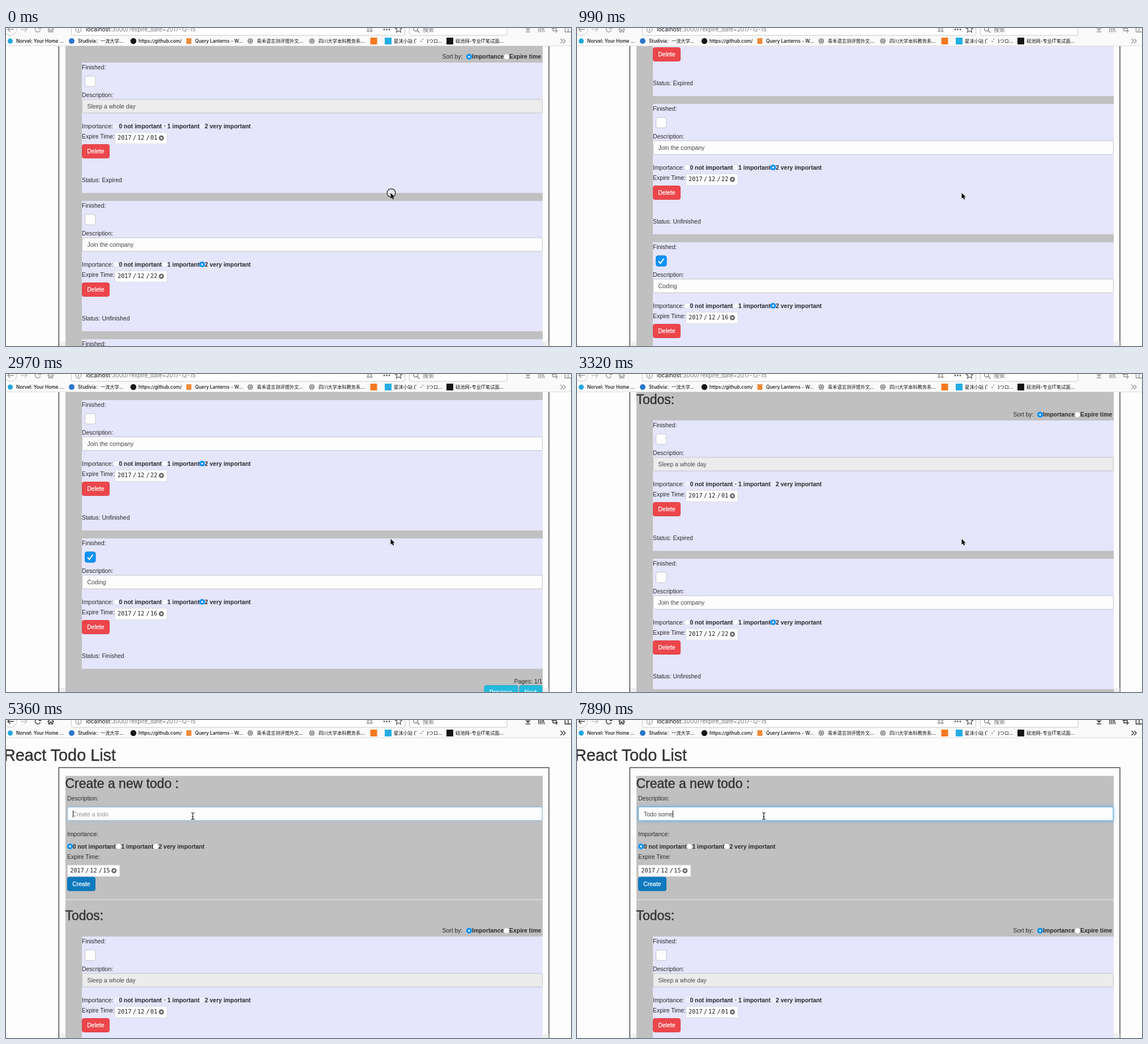
These frames come from a looping animation (998x561 px, 8000 ms). An HTML page:

```html
<!DOCTYPE html>
<html lang="en">
<head>
<meta charset="utf-8">
<title>Todo list</title>
<style>
html, body { margin: 0; width: 100%; height: 100%; overflow: hidden; background: #fdfdfd; }
svg { display: block; width: 100vw; height: 100vh; }
text { font: 10.45px "Liberation Sans", Arial, sans-serif; fill: #2b2b2b; white-space: pre; }
.b { font-weight: 700; }
.h { stroke: #333; stroke-width: .45; fill: #333; }
.h1 { font-size: 28.8px; }
.h2 { font-size: 23px; }
.btn { fill: #fff; stroke: #fff; stroke-width: .25; }
.field { fill: #484848; }
.hint { fill: #929292; }
.date { font: 10.2px "DejaVu Sans Mono", monospace; fill: #222; }
.mark { font: 500 8.25px Inter, "Noto Sans CJK SC", "Noto Sans CJK", sans-serif; fill: #111; }
.url { font: 10.1px Inter, sans-serif; fill: #777; }
.url tspan { fill: #111; }
.menu { font: 500 8.8px Inter, sans-serif; fill: #111; }
#focus { filter: drop-shadow(0 0 3px rgba(80, 170, 240, .75)); }
#menu rect { filter: drop-shadow(0 3px 3px rgba(0, 0, 0, .75)); }
#tools { fill: none; stroke-width: 1.4; stroke: #999; }
#tools.on { stroke: #333; }
</style>
</head>
<body>
<svg viewBox="0 0 998 561" preserveAspectRatio="none">
  <g id="page"></g>
  <g fill="#eeeeee"><path d="M94 553.5h11v8h-11zM948 553.5h10.5v8h-10.5z"/></g>
  <g id="focus"><rect x="108.5" y="153.5" width="838.5" height="24" rx="2.5" fill="#fff" stroke="#5db0ee"/></g>
  <text id="typed" class="field" x="118" y="169.7"></text>
  <path id="caret" d="M.5 159.5v12.5" stroke="#111"/>
  <g id="menu">
    <rect x="108" y="178" width="840" height="14" fill="#fdfdfd"/>
    <text class="menu" x="112" y="188.4">test</text>
  </g>
  <g id="chrome"></g>
  <g id="arrow">
    <circle id="ring" cx="1" cy="0" r="7.4" fill="#fff" fill-opacity=".35" stroke="#222" stroke-width="1.2"/>
    <path d="M0 0V10L2.3 7.9 3.9 11.5 5.6 10.7 4.1 7.3H7.2Z" fill="#000" stroke="#fff" stroke-width=".8" stroke-linejoin="round" paint-order="stroke"/>
  </g>
  <path id="beam" d="M327 163.5q3 0 3 2v8q0 2-3 2M333 163.5q-3 0-3 2v8q0 2 3 2M328.5 170.5h3" fill="none" stroke="#222" stroke-width="1.2"/>
</svg>
<script>
const $ = id => document.getElementById(id);
const text = (x, y, s, cls = '') => `<text x="${x}" y="${y}" class="${cls}">${s}</text>`;
const rect = (x, y, w, h, fill, more = '') =>
  `<rect x="${x}" y="${y}" width="${w}" height="${h}" fill="${fill}" ${more}/>`;
const dot = (x, y, r, fill, more = '') => `<circle cx="${x}" cy="${y}" r="${r}" fill="${fill}" ${more}/>`;

const button = (x, y, w, s, fill, edge) =>
  rect(x + .5, y + .5, w - 1, 24, fill, `rx="3" stroke="${edge}"`) + text(x + 9.3, y + 16.2, s, 'btn');

const input = (x, y, w, s, fill, cls) =>
  rect(x + .5, y + .5, w - 1, 24, fill, 'rx="2.5" stroke="#c2c2c8"') + text(x + 9.5, y + 16.7, s, cls);

function radio(x, y, on, off) {
  if (off) return dot(x, y, 4.6, '#efeffb') + (on ? dot(x, y, 1.3, '#777') : '');
  return on ? dot(x, y, 5.1, '#0d93f8') + dot(x, y, 1.7, '#fff')
            : dot(x, y, 4.7, '#fcfcfc', 'stroke="#ccc" stroke-width=".5"');
}

const levels = (x, y, pick, off) => ['0 not important', '1 important', '2 very important'].map((s, i) => {
  const left = x + [0, 85.7, 151.7][i];
  return radio(left, y, i === pick, off) + text(left + 4.7, y + 3.7, s, 'b');
}).join('');

function dateBox(x, y, day) {
  const parts = [[5, '2017'], [32, '/'], [40, '12'], [55.5, '/'], [63, day]];
  return rect(x + .5, y + .5, 92, 20, '#fdfdfd', 'stroke="#dcdce4"') +
    parts.map(([dx, s]) => text(x + dx, y + 13.6, s, 'date')).join('') +
    dot(x + 82.5, y + 10.2, 4.5, '#666') +
    `<path d="M${x + 80.8} ${y + 8.5}l3.4 3.4m0-3.4l-3.4 3.4" stroke="#fff" stroke-width="1.2"/>`;
}

function card(y, { name, pick, day, status, done, off }) {
  return rect(134, y, 814, 230, '#e5e5fb') +
    text(134, y + 11.8, 'Finished:') +
    rect(139.5, y + 23.8, 18.6, 18.4, done ? '#0d93f8' : '#fdfdfd', `rx="3.5" stroke="${done ? '#0d86e4' : '#c4c4cc'}"`) +
    (done ? `<path d="M144 ${y + 33.5}l3.3 3.7 6-8.4" fill="none" stroke="#fff" stroke-width="2"/>` : '') +
    text(134, y + 60.9, 'Description:') +
    input(134, y + 64.5, 814, name, off ? '#ececec' : '#fdfdfd', 'field') +
    text(134, y + 115.7, 'Importance:') + levels(194.7, y + 112, pick, off) +
    text(134, y + 134, 'Expire Time:') + dateBox(192, y + 122.8, day) +
    button(134, y + 144, 49, 'Delete', '#ec464b', '#dc4147') +
    rect(134, y + 184, 814, 1, '#e9e9f5') +
    text(134, y + 210.6, 'Status: ' + status);
}

const todos = [
  { name: 'Sleep a whole day', pick: 1, day: '01', status: 'Expired', off: true },
  { name: 'Join the company', pick: 2, day: '22', status: 'Unfinished' },
  { name: 'Coding', pick: 2, day: '16', status: 'Finished', done: true }
];

$('page').innerHTML =
  text(-4, 71.5, 'React Todo List', 'h h1') +
  rect(93.3, 84, 865.7, 1200, '#fdfdfd', 'stroke="#333" stroke-width="1.3"') +
  rect(105, 98.5, 843, 1180, '#c0c0c0') +
  text(104.5, 120, 'Create a new todo :', 'h h2') +
  text(108, 142.3, 'Description:') +
  input(108, 153, 840, 'Create a todo', '#fdfdfd', 'hint') +
  text(108, 204.5, 'Importance:') + levels(113, 223, 0) +
  text(108, 245, 'Expire Time:') + dateBox(108.3, 255.5, '15') +
  button(108, 276.7, 50, 'Create', '#0f7abf', '#0d70b0') +
  rect(105, 316.3, 843, 1.2, '#e6e6e6') +
  text(104.5, 353.2, 'Todos:', 'h h2') +
  text(770.5, 375.4, 'Sort by:') +
  radio(818, 371.7, true) + text(823, 375.4, 'Importance', 'b') +
  radio(884, 371.7) + text(889, 375.4, 'Expire time', 'b') +
  todos.map((todo, i) => card(382 + 244 * i, todo)).join('') +
  text(897.5, 1125.7, 'Pages: 1/1') +
  button(844.5, 1129, 60, 'Previous', '#22bbdd', '#1cafd0') +
  button(906.5, 1129, 41, 'Next', '#22bbdd', '#1cafd0');

const globe = x => dot(x, 23, 4.8, '#777') +
  `<path d="M${x - 4} 21.5h8M${x - 4} 24.8h8M${x} 18.5q-4 4.5 0 9q4-4.5 0-9" fill="none" stroke="#eee" stroke-width=".8"/>`;
const square = (x, fill) => rect(x, 17, 12, 12, fill);
const marks = [
  [18, 'Norvel: Your Home ...'], [127, 'Studivia：一流大学...'], [234, 'https://github.com/'],
  [334, 'Query Lanterns - W...'], [443, '青禾语言测评馆外文...'], [552, '四川大学本科教务系...'],
  [685, '星沫小站 (゜-゜)つロ...'], [794, '砚池网-专业IT笔试面...']
];

$('chrome').innerHTML =
  rect(0, 0, 998, 31.5, '#fafafa') + rect(0, 31, 998, 1, '#dedede') +
  rect(115.5, -12, 589, 25, '#fff', 'rx="2.5" stroke="#c8c8c8"') +
  rect(712.5, -12, 172.5, 25, '#fff', 'rx="2.5" stroke="#c8c8c8"') +
  dot(8, 2.5, 10.5, '#fdfdfd', 'stroke="#c4c4c4"') +
  `<g id="tools">
    <path d="M14 2.5H3m4.5-4.5L3 2.5 7.5 7"/>
    <path d="M60 0a4.6 4.6 0 1 0 .5 4M61.5-3v4h-4"/>
    <path d="M73.5 3l5.5-5 5.5 5M75.3 2v5h2.4V3.5h2.6V7h2.4V2"/>
    <path d="M922-4v8m-3.7-3.4L922 4.2l3.7-3.6M918 6.7h8"/>
    <path d="M941-3V7.5M944-3V7.5M947-3V7.5M948.5-2.5l2.3 10"/>
    <path d="M966-3v8h9M963.5.5h8.5v8"/>
    <path d="M987.5-4h12V7h-12zM993-4V7"/>
    <path d="M979.5 19l4 4-4 4m4.5-8l4 4-4 4"/>
  </g>
  <g fill="none" stroke="#777">
    <path d="M26 2.5h11m-4.5-4.5L37 2.5 32.5 7" stroke="#c4c4c4" stroke-width="1.4"/>
    <circle cx="128" cy="2.8" r="4.8"/><path d="M128 2v3.5M128-.2v1.2" stroke-width="1.3"/>
    <path d="M638-2h3v3h-3zM643.5-2h3v3h-3zM638 3.5h3v3h-3zM643.5 3.5h3v3h-3z"/>
    <path d="M693.5-4l1.8 4 4.2.3-3.2 2.9 1 4.2-3.8-2.3-3.8 2.3 1-4.2-3.2-2.9 4.2-.3z" stroke="#555" stroke-width="1.2"/>
    <circle cx="723.5" cy="1.5" r="3.8" stroke-width="1.3"/><path d="M726.3 4.3l4 4" stroke-width="1.5"/>
  </g>` +
  [668, 672.5, 677].map(x => dot(x, 2.7, 1.4, '#555')).join('') +
  text(141, 6.3, '<tspan>localhost</tspan>:3000/?expire_date=2017-12-15', 'url') +
  text(736, 6.8, '搜索', 'url') +
  dot(7.5, 23, 4.5, '#20a8dc') + dot(116, 23, 5, '#2a76cc') + dot(225, 23, 5.2, '#161616') +
  rect(318.5, 18, 9, 10, '#f08b38') + globe(431.5) + globe(540.3) +
  square(643.5, '#f5791f') + square(669, '#23ade5') + square(778, '#151515') +
  marks.map(([x, s]) => text(x, 26.3, s, 'mark')).join('');

// Each track holds [start, value...] and keeps a value until the next start.
const scroll = [[0, 321], [140, 326], [310, 345], [480, 384], [640, 428], [820, 492], [1000, 556], [1170, 586],
  [2970, 580], [3140, 500], [3320, 300], [3500, 90], [3680, 0]];
const pointer = [[0, 679.5, 291], [3500, 650, 295], [3680, 560, 305.5], [3860, 510, 222], [4040, 440, 190],
  [4190, 385, 177], [4340, 350, 170], [4480, 335, 167], [4630, 330, 167]];
const typing = [[0, ''], [6250, 'T'], [6400, 'To'], [6700, 'Tod'], [6850, 'Todo'], [6990, 'Todo '],
  [7290, 'Todo s'], [7590, 'Todo so'], [7740, 'Todo som'], [7890, 'Todo some']];
const glow = [[0, 0], [5360, .55], [5510, 1]];
const caret = [[0, 0], [5360, 1], [5950, 0], [6250, 1]];
const menu = [[0, 0], [6250, 1], [6400, .5], [6550, 0]];
const at = (track, t) => track.findLast(([start]) => start <= t).slice(1);
const fade = (id, v) => $(id).setAttribute('opacity', v);

function draw() {
  const t = performance.now() % 8000;
  const [typed] = at(typing, t);
  const focus = at(glow, t)[0];
  const awake = t >= 4770;
  $('page').setAttribute('transform', `translate(0 ${-at(scroll, t)[0]})`);
  $('arrow').setAttribute('transform', `translate(${at(pointer, t)})`);
  fade('arrow', awake ? 0 : 1);
  fade('beam', awake ? 1 : 0);
  fade('ring', t < 140 ? 1 : 0);
  $('tools').classList.toggle('on', awake);
  fade('focus', focus);
  $('focus').firstChild.setAttribute('fill', typed ? '#fdfdfd' : 'none');
  $('typed').textContent = typed;
  const end = typed ? $('typed').getComputedTextLength() : 0;
  $('caret').setAttribute('transform', `translate(${Math.round(118 + end)} 0)`);
  fade('caret', at(caret, t)[0]);
  fade('menu', at(menu, t)[0]);
  requestAnimationFrame(draw);
}
draw();
</script>
</body>
</html>
```
